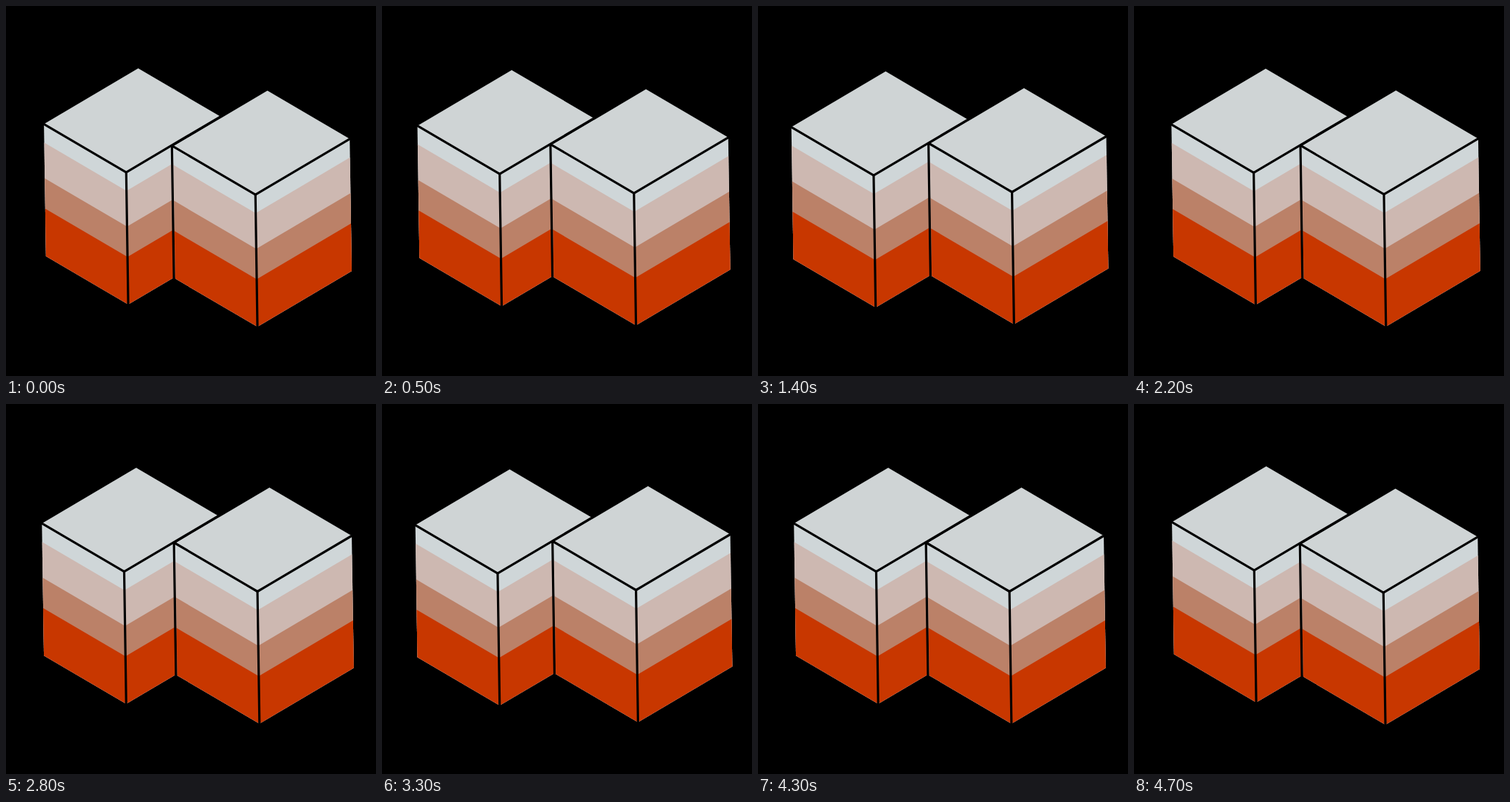
Write an HTML page that moves like this. It is 518 px wide and 518 px high and loops after 4800 ms.

```html
<!DOCTYPE html>
<html lang="en">
<head>
<meta charset="utf-8">
<title>Two striped prisms</title>
<style>
html, body { margin: 0; width: 100%; height: 100%; overflow: hidden; background: #000; }
svg { display: block; width: 100vw; height: 100vh; }
.ink { fill: none; stroke: #000; stroke-width: 3.2; stroke-linejoin: round; stroke-linecap: round; }
</style>
</head>
<body>
<svg viewBox="0 0 518 518">
  <g id="back"></g>
  <g id="front"></g>
</svg>
<script>
const NS = "http://www.w3.org/2000/svg";
const TOP = "#cfd4d5";
const BANDS = ["#cfd6d8", "#cdb8b1", "#bb8168", "#c83700"];
const LEVELS = [0, 26, 76, 118.5, 185];
const LEFT = [-115.2, -67.5];
const RIGHT = [132, -78];
const LEAN = 0.0152;
const STEP_MS = 100;
const HALF = 12;

const add = (...vectors) => vectors.reduce((a, b) => [a[0] + b[0], a[1] + b[1]]);
const down = d => [d * LEAN, d];
const path = points => "M" + points.map(p => p.join(" ")).join("L");

function draw(parent, points, fill) {
  const el = document.createElementNS(NS, "path");
  el.setAttribute("d", path(points) + (fill ? "Z" : ""));
  if (fill) el.setAttribute("fill", fill);
  else el.setAttribute("class", "ink");
  parent.append(el);
}

// A prism hangs from its nearest top corner at the group's origin.
function prism(group, overlaps) {
  const o = [0, 0];
  const base = down(LEVELS[4]);
  if (overlaps) {
    const shift = [-0.8, -1.2];
    draw(group, [add(LEFT, shift), add(LEFT, RIGHT, shift)]);
  }
  draw(group, [o, LEFT, add(LEFT, RIGHT), RIGHT], TOP);
  // Each band reaches the base, so the next one covers it without a seam.
  for (const side of [LEFT, RIGHT]) {
    BANDS.forEach((color, i) => {
      const a = down(LEVELS[i]);
      draw(group, [a, add(a, side), add(base, side), base], color);
    });
  }
  draw(group, [LEFT, o, RIGHT]);
  draw(group, [o, base]);
  if (overlaps) {
    const edge = add(LEFT, [-1.7, 0]);
    draw(group, [edge, add(edge, base)]);
  }
}

const back = document.getElementById("back");
const front = document.getElementById("front");
prism(back, false);
prism(front, true);

function place(group, x, y) {
  group.setAttribute("transform", `translate(${x} ${y})`);
}

// Even steps outwards, then the same steps back.
function frame() {
  const step = Math.floor(performance.now() / STEP_MS) % (2 * HALF);
  const k = step < HALF ? step : 2 * HALF - 1 - step;
  place(back, 168.3 - 0.71 * k, 232.8 + 0.48 * k);
  place(front, 349.2 + 0.71 * k, 264.1 - 0.4 * k);
  requestAnimationFrame(frame);
}
frame();
</script>
</body>
</html>
```
